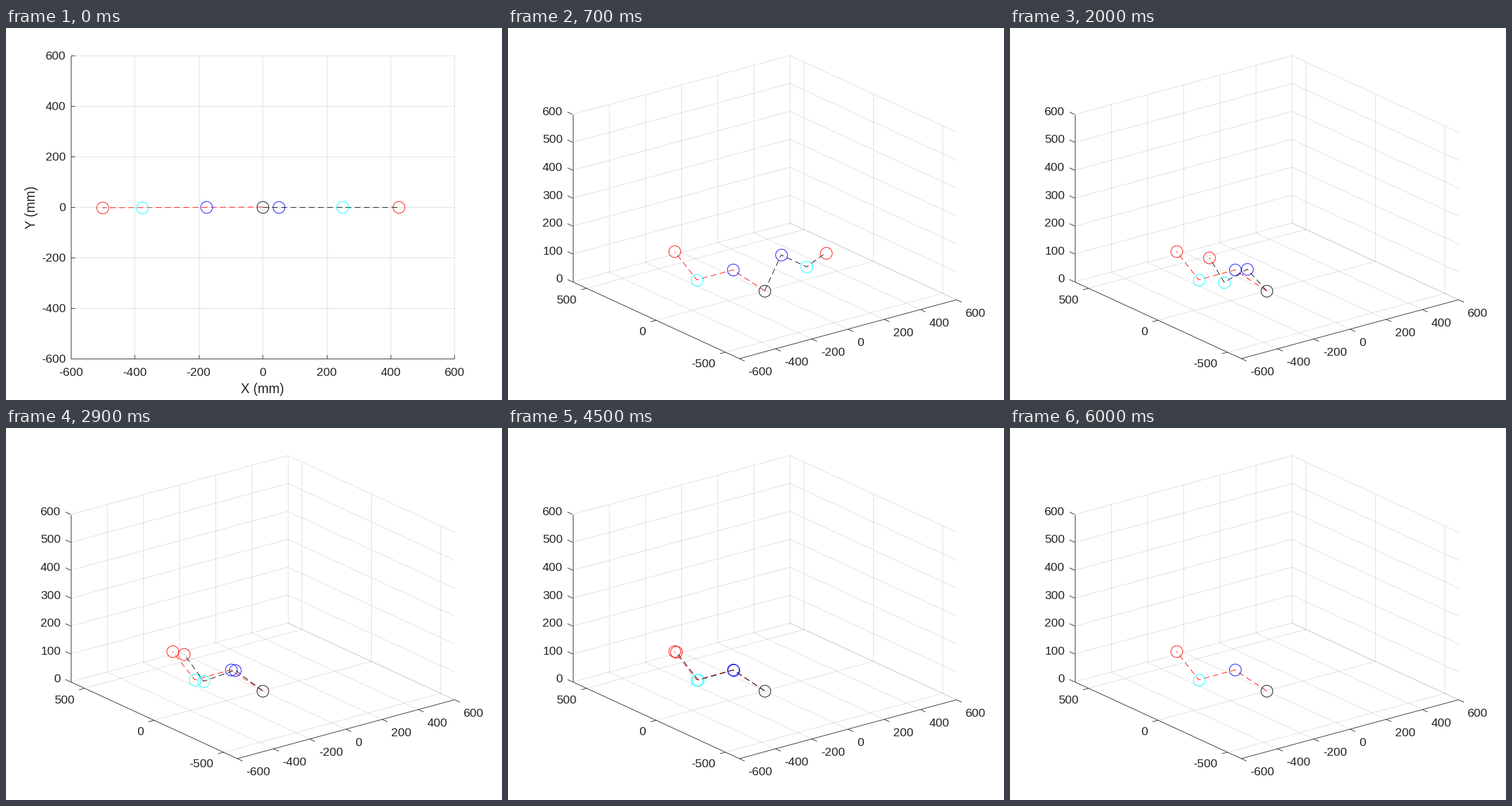
Recreate the animation shown at these times as a matplotlib script. Size 864 by 648 pixels, loop 6.1 s.

```python
import numpy as np
import matplotlib.pyplot as plt
from matplotlib.animation import FuncAnimation

W, H = 864, 648
FRAMES, INTERVAL = 61, 100
LEFT, RIGHT, TOP, BOTTOM = 112.7, 781.4, 48.0, 575.9
LIM = 600
AZ, EL = np.radians(37.5), np.radians(30)
INK = "#262626"

GOAL = np.radians([-179.7, 45, 45, 45])   # waist, shoulder, elbow, wrist
GAIN = np.array([0.10, 0.11, 0.12, 0.13])  # share of the error removed per step
JOINT_COLORS = ["blue", "cyan", "red"]

plt.rcParams["font.family"] = "Liberation Sans"
fig = plt.figure(figsize=(W / 72, H / 72), dpi=72, facecolor="white")
ax = fig.add_axes([0, 0, 1, 1])
ax.set_xlim(0, W)
ax.set_ylim(H, 0)
ax.axis("off")


def top_view(p):
    p = np.asarray(p, float)
    x = LEFT + (p[..., 0] + LIM) / (2 * LIM) * (RIGHT - LEFT)
    y = BOTTOM - (p[..., 1] + LIM) / (2 * LIM) * (BOTTOM - TOP)
    return np.stack([x, y], -1)


def oblique_view(p):
    """Orthographic view of the unit box, stretched to fill the plot area."""
    u, v, w = np.moveaxis(np.asarray(p, float), -1, 0)
    u, v, w = (u + LIM) / (2 * LIM), (v + LIM) / (2 * LIM), w / LIM
    ca, sa, ce, se = np.cos(AZ), np.sin(AZ), np.cos(EL), np.sin(EL)
    sx = (RIGHT - LEFT) / (ca + sa)
    sy = (BOTTOM - TOP) / (se * (ca + sa) + ce)
    x = LEFT + sx * (sa + ca * u - sa * v)
    y = BOTTOM - sy * (se * (sa * u + ca * v) + ce * w)
    return np.stack([x, y], -1)


def joints(angles):
    waist, shoulder, elbow, wrist = angles
    fore = elbow - shoulder
    hand = fore + wrist
    c, s = np.cos(shoulder), np.sin(shoulder)
    reach = np.cumsum([0, 50 * c + 200 * s, 200 * np.cos(fore), 175 * np.cos(hand)])
    height = np.cumsum([0, 200 * c - 50 * s, 200 * np.sin(fore), 175 * np.sin(hand)])
    return np.stack([reach * np.cos(waist), reach * np.sin(waist), height], -1)


def segment(a, b, color=INK, alpha=1.0):
    line, = ax.plot([a[0], b[0]], [a[1], b[1]], color=color, alpha=alpha,
                    lw=1, solid_capstyle="butt", zorder=1)
    return line


def grid(view, a, b):
    return segment(view(a), view(b), alpha=0.15)


def label(x, y, text, ha, size=21, **kw):
    return ax.text(x, y, text, ha=ha, va="baseline", fontsize=size, color=INK, **kw)


def build_flat():
    parts = []
    for t in range(-LIM, LIM + 1, 200):
        if t > -LIM:
            parts += [grid(top_view, (t, -LIM), (t, LIM)),
                      grid(top_view, (-LIM, t), (LIM, t))]
        x, y = top_view((t, t))
        parts += [segment((x, BOTTOM), (x, BOTTOM - 7)),
                  segment((LEFT, y), (LEFT + 7, y)),
                  label(x, 605.6, str(t), "center"),
                  label(104.2, y + 7.4, str(t), "right")]
    parts += [segment((LEFT, TOP), (LEFT, BOTTOM)),
              segment((LEFT, BOTTOM), (RIGHT, BOTTOM)),
              label(447, 636, "X (mm)", "center", 23),
              label(51, 312.4, "Y (mm)", "center", 23, rotation=90,
                    rotation_mode="anchor")]
    return parts


def build_box():
    view, parts = oblique_view, []
    origin = view((0, 0, 0))
    along_x = view((100, 0, 0)) - origin
    along_y = view((0, 100, 0)) - origin
    along_x /= np.hypot(*along_x)
    along_y /= np.hypot(*along_y)

    def tick(point, step, dx, dy, text, ha):
        p = view(point)
        return [segment(p, p + 10 * step),
                label(p[0] + dx, p[1] + dy + 7.4, text, ha)]

    for t in range(-LIM, LIM + 1, 200):
        if t > -LIM:
            parts += [grid(view, (t, -LIM, 0), (t, LIM, 0)),
                      grid(view, (t, LIM, 0), (t, LIM, LIM))]
        parts += tick((t, -LIM, 0), -along_y, 15.5, 22, str(t), "left")
    for t in (-500, 0, 500):
        parts += [grid(view, (-LIM, t, 0), (LIM, t, 0)),
                  grid(view, (LIM, t, 0), (LIM, t, LIM))]
        parts += tick((-LIM, t, 0), -along_x, -17.5, 18.7, str(t), "right")
    for t in range(0, LIM + 1, 100):
        parts += [grid(view, (-LIM, LIM, t), (LIM, LIM, t)),
                  grid(view, (LIM, -LIM, t), (LIM, LIM, t))]
        parts += tick((-LIM, LIM, t), along_y, -17.5, -6.3, str(t), "right")

    corner, front = view((-LIM, LIM, 0)), view((-LIM, -LIM, 0))
    parts += [segment(corner, view((-LIM, LIM, LIM))),
              segment(corner, front),
              segment(front, view((LIM, -LIM, 0)))]
    return parts


def ring(color, zorder):
    return ax.plot([], [], "o", ms=20.5, mew=1, mfc="none", mec=color,
                   zorder=zorder)[0]


class Arm:
    def __init__(self, color, zorder):
        self.line, = ax.plot([], [], color=color, lw=1, ls=(0, (10, 6)), zorder=zorder)
        self.dots = [ring(c, zorder + 0.5) for c in JOINT_COLORS]

    def place(self, pts):
        self.line.set_data(pts[:, 0], pts[:, 1])
        for dot, (x, y) in zip(self.dots, pts[1:]):
            dot.set_data([x], [y])

    def show(self, on):
        for part in [self.line, *self.dots]:
            part.set_visible(on)


flat, box = build_flat(), build_box()
target, mover, base = Arm("red", 2), Arm("black", 3), ring("black", 4)


def update(k):
    for part in flat:
        part.set_visible(k == 0)
    for part in box:
        part.set_visible(k > 0)
    view = top_view if k == 0 else oblique_view
    x, y = view((0, 0, 0))
    base.set_data([x], [y])
    target.place(view(joints(GOAL)))
    mover.place(view(joints(GOAL * (1 - (1 - GAIN) ** k))))
    # the moving arm is gone once the goal is reached
    mover.show(k < FRAMES - 1)
    return []


anim = FuncAnimation(fig, update, frames=FRAMES, interval=INTERVAL,
                     init_func=lambda: update(0), repeat=True, repeat_delay=0,
                     blit=False)
plt.show()
```
